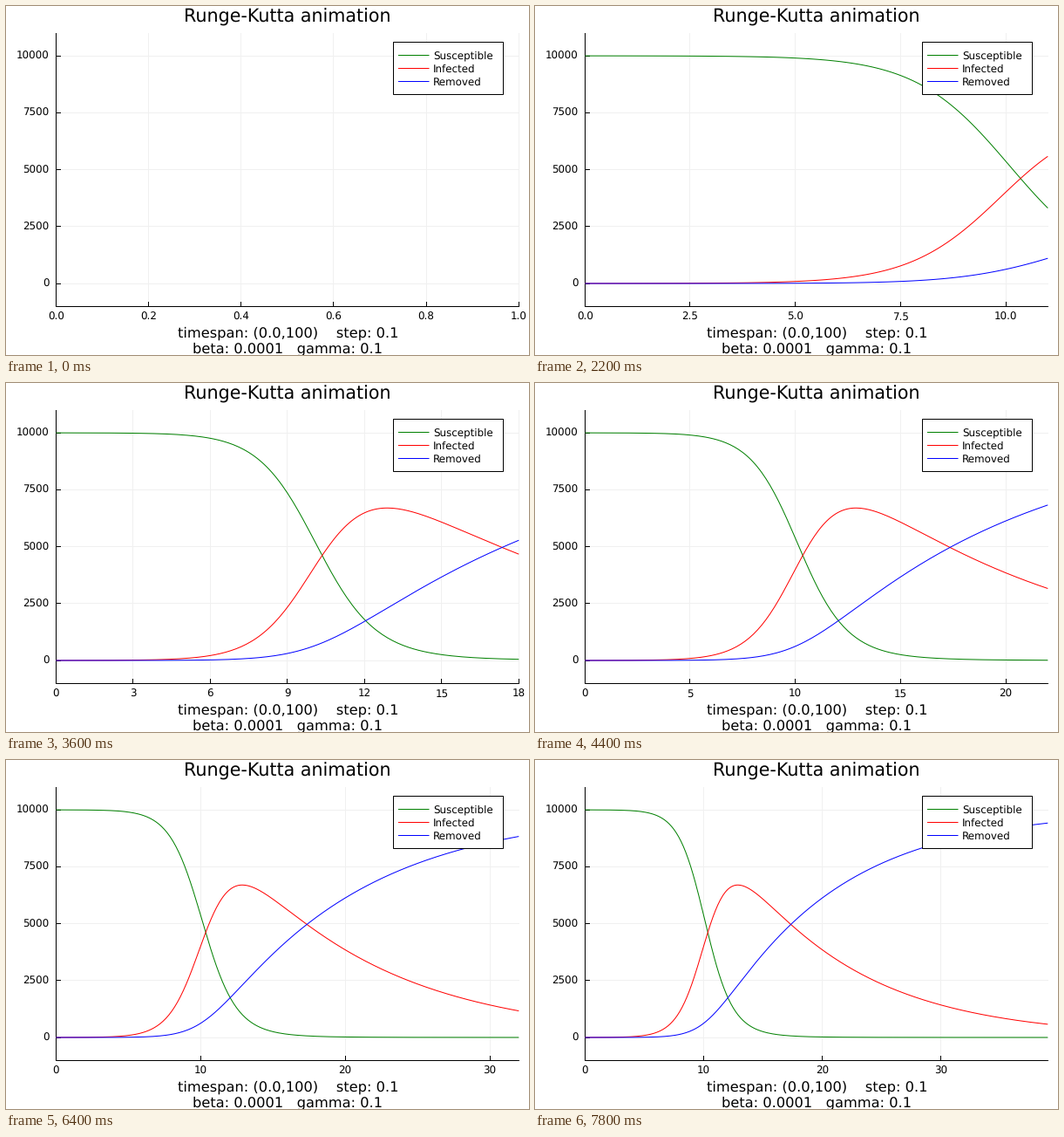
Animation of 600 by 400 pixels, one loop 8 s. Source, as a matplotlib script:

```python
import numpy as np
import matplotlib.pyplot as plt
from matplotlib.animation import FuncAnimation
from matplotlib.patches import Rectangle

plt.rcParams["font.family"] = "DejaVu Sans"
plt.rcParams["text.hinting"] = "none"

W, H, DPI = 600, 400, 100
PT = 72 / DPI                       # points per pixel
LEFT, RIGHT, TOP, BOTTOM = 57.3, 588.3, 31.0, 344.1
Y_MIN, Y_MAX = -1000, 11000
SMALL, MEDIUM, LARGE = 11.84, 16.28, 20.7
BETA, GAMMA, STEP = 0.0001, 0.1, 0.1
FRAMES, INTERVAL = 40, 200


def rates(u):
    s, i, _ = u
    return np.array([-BETA * s * i, BETA * s * i - GAMMA * i, GAMMA * i])


def runge_kutta(u, n):
    rows = [u]
    for _ in range(n):
        k1 = rates(u)
        k2 = rates(u + STEP / 2 * k1)
        k3 = rates(u + STEP / 2 * k2)
        k4 = rates(u + STEP * k3)
        u = u + STEP / 6 * (k1 + 2 * k2 + 2 * k3 + k4)
        rows.append(u)
    return np.array(rows)


def tick_step(span):
    """Nicest spacing for 4 to 8 ticks; spacings that end on the limit come first."""
    best = None
    for scale in (0.1, 1, 10):
        for q, nice in ((1, 1), (5, 0.9), (2, 0.7), (2.5, 0.5), (3, 0.2)):
            step = q * scale
            n = int(span / step + 1e-9)
            if not 3 <= n <= 7:
                continue
            exact = abs(n * step - span) < 1e-9
            score = (1 - abs(n - 4) / 5) / 4 + span / (n * step) / 2 + nice / 4
            key = (exact, round(score, 6), -step if exact else step)
            if best is None or key > best[0]:
                best = key, step
    return best[1]


def to_y(v):
    return BOTTOM - (v - Y_MIN) / (Y_MAX - Y_MIN) * (BOTTOM - TOP)


def crisp(v):
    """Centre of the pixel that holds v."""
    return np.floor(v) + 0.5


def segments(xs, y0, y1):
    """Separate vertical strokes as one broken line."""
    x = np.repeat(crisp(xs), 3)
    y = np.tile([y0, y1, np.nan], len(xs))
    return x, y


fig = plt.figure(figsize=(W / DPI, H / DPI), dpi=DPI, facecolor="white")
ax = fig.add_axes([0, 0, 1, 1])
ax.set_xlim(0, W)
ax.set_ylim(H, 0)
ax.axis("off")


def stroke(x, y, color, z):
    return ax.plot(x, y, color=color, lw=PT, zorder=z, snap=False,
                   solid_capstyle="butt")[0]


def label(x, y, text, size, ha="center", z=4):
    return ax.text(x, y, text, fontsize=size * PT, ha=ha, va="baseline", zorder=z)


# Fixed parts
label(322.3, 18.4, "Runge-Kutta animation", LARGE)
label(323.4, 380, "timespan: (0.0,100)    step: 0.1", MEDIUM)
label(322.8, 398, "beta: 0.0001   gamma: 0.1", MEDIUM)
stroke([57.5, 57.5], [31, 345], "black", 2)
stroke([57, 589], [344.5, 344.5], "black", 2)
for v in range(0, 10001, 2500):
    y = to_y(v)
    stroke([57, 589], [crisp(y)] * 2, "#f0f0f0", 1)
    stroke([57, 63], [crisp(y)] * 2, "black", 2)
    label(49.7, y + 3.9, str(v), SMALL, "right")

# Moving parts
grid = stroke([], [], "#f0f0f0", 1)
ticks = stroke([], [], "black", 2)
tick_labels = [label(0, 359.4, "", SMALL) for _ in range(8)]
series = (("Susceptible", "green"), ("Infected", "red"), ("Removed", "blue"))
curves = [stroke([], [], color, 3) for _, color in series]

# Legend
ax.add_patch(Rectangle((444.5, 41.5), 126, 60, fc="white", ec="black",
                       lw=PT, zorder=5, snap=False))
for row, (name, color) in enumerate(series):
    y = 56.5 + 15 * row
    stroke([450, 485.5], [y, y], color, 6)
    label(490, y + 4.4, name, SMALL, "left", 6)

data = runge_kutta(np.array([9999.0, 1.0, 0.0]), round((FRAMES - 1) / STEP))
times = np.arange(len(data)) * STEP


def update(frame):
    span = max(frame, 1)
    scale = (RIGHT - LEFT) / span
    step = tick_step(span)
    values = np.arange(int(span / step + 1e-9) + 1) * step
    xs = LEFT + values * scale
    grid.set_data(*segments(xs, TOP, BOTTOM))
    ticks.set_data(*segments(xs, 339, 345))

    digits = 0 if step % 1 == 0 else 1
    for k, text in enumerate(tick_labels):
        shown = k < len(xs)
        text.set_visible(shown)
        if shown:
            text.set_x(xs[k])
            text.set_text(f"{values[k]:.{digits}f}")

    n = round(frame / STEP) + 1 if frame else 0
    for k, curve in enumerate(curves):
        curve.set_data(LEFT + times[:n] * scale, to_y(data[:n, k]))
    return [grid, ticks, *tick_labels, *curves]


anim = FuncAnimation(fig, update, frames=FRAMES, interval=INTERVAL,
                     init_func=lambda: update(0), repeat=True,
                     repeat_delay=0, blit=False)
plt.show()
```
